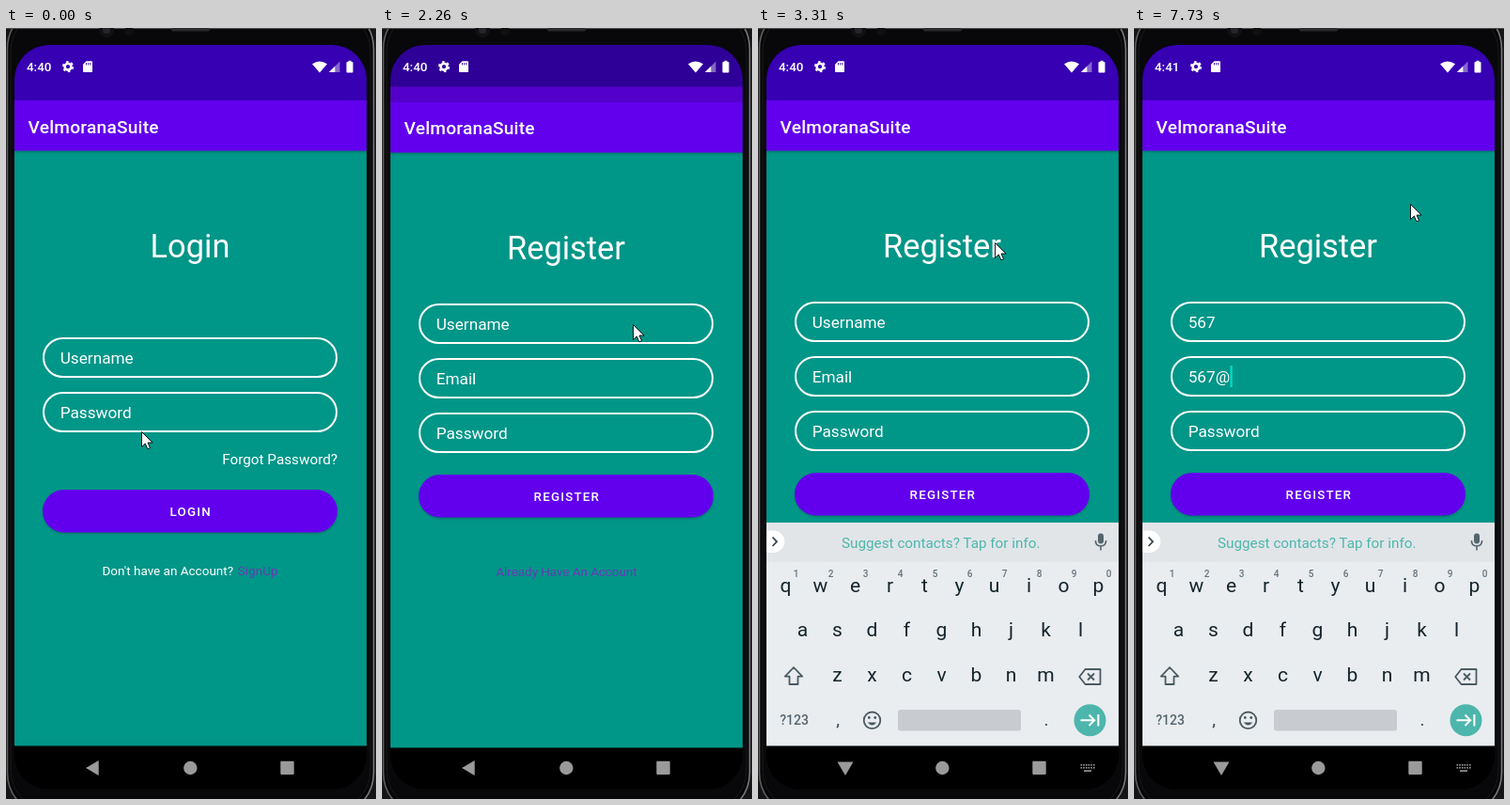
Animation of 394 by 820 pixels, one loop 8 s. Source, as an HTML page:

```html
<!DOCTYPE html>
<html lang="en">
<head>
<meta charset="utf-8">
<title>Register flow</title>
<style>
  html, body { margin: 0; width: 100%; height: 100%; overflow: hidden; background: #050506; }
  svg { display: block; width: 100%; height: 100%; }
  text { font-family: Roboto, sans-serif; fill: #fff; white-space: pre; }
  .medium { font-weight: 500; }
  .mid { text-anchor: middle; }
  .link { fill: #673ab7; }
  .key { fill: #14242c; font-size: 21px; text-anchor: middle; }
  .digit { fill: #65737a; font-size: 10px; font-weight: 500; text-anchor: middle; }
  .line { fill: none; stroke: #4a5a62; stroke-width: 1.8; }
</style>
</head>
<body>
<svg id="stage" viewBox="0 0 394 820"></svg>
<script>
const LOOP = 8000;
const APP_NAME = 'VelmoranaSuite';
const SCREEN = { top: 18, height: 792 };
const FIELD_X = 57.7;

const rect = (x, y, w, h, fill, extra = '') =>
  `<rect x="${x}" y="${y}" width="${w}" height="${h}" fill="${fill}" ${extra}/>`;
const label = (x, y, size, str, cls = '', extra = '') =>
  `<text x="${x}" y="${y}" font-size="${size}" class="${cls}" ${extra}>${str}</text>`;
const path = (d, fill, extra = '') => `<path d="${d}" fill="${fill}" ${extra}/>`;
const circle = (x, y, r, fill, extra = '') =>
  `<circle cx="${x}" cy="${y}" r="${r}" fill="${fill}" ${extra}/>`;

const field = (y, hint, id = '') =>
  rect(40, y + 1, 312, 41, 'none', 'rx="20.5" stroke="#fff" stroke-width="2"') +
  label(FIELD_X, y + 28, 17.2, hint, '', id && `id="${id}"`);

const button = (y, str) =>
  rect(39, y + 1.5, 314, 45.5, '#000', 'rx="22.7" opacity=".2" filter="url(#soft)"') +
  rect(39, y, 314, 45.5, '#6200ee', 'rx="22.7"') +
  label(196.8, y + 27.8, 13.37, str, 'medium mid', 'letter-spacing="1.19"');

const page = (title, body) =>
  rect(9, 130, 375, 633.5, '#009688') +
  rect(9, 130, 375, 4, 'url(#barShadow)') +
  rect(9, 77, 375, 53.5, '#6200ee') +
  label(23.5, 111.5, 19.1, APP_NAME, 'medium', 'letter-spacing=".24"') +
  label(196, 243.6, 34.4, title, 'mid') + body;

const statusBackground = id => rect(9, 18, 375, 59.5, '#3700b3', `id="${id}"`);

const loginPage = statusBackground('loginStatus') + page('Login',
  field(329, 'Username') + field(387, 'Password') +
  label(353, 463.6, 15.28, 'Forgot Password?', '', 'text-anchor="end"') +
  button(491, 'LOGIN') +
  label(102.5, 581.6, 13.5, "Don't have an Account?") +
  label(246.8, 581.6, 13.5, 'SignUp', 'link'));

const registerPage = statusBackground('registerStatus') + page('Register',
  field(291, 'Username', 'username') + field(349, 'Email', 'email') + field(407, 'Password') +
  button(473, 'REGISTER') +
  label(196.5, 581, 13.37, 'Already Have An Account', 'link mid') +
  rect(0, 301, 2.4, 23, '#03dac5', 'id="caret"'));

const statusIcons =
  label(22, 46.3, 13.4, '4:40', 'medium', 'id="clock"') +
  circle(66, 41.2, 3.4, 'none', 'stroke="#fff" stroke-width="2.6"') +
  circle(66, 41.2, 5.2, 'none', 'stroke="#fff" stroke-width="1.8" stroke-dasharray="2.6 2.845"') +
  path('M85.5 35.2H91.2Q92 35.2 92 36V46.2Q92 47 91.2 47H83Q82 47 82 46.2V38.7Z', '#fff') +
  path('M85.5 37v2.4M87.6 37v2.4M89.7 37v2.4', 'none', 'stroke="#3700b3" stroke-width=".9"') +
  path('M334 47.5L326 38.2Q334 33 342 38.2Z', '#fff') +
  path('M355.5 35.5V47H344Z', '#fff', 'opacity=".4"') +
  path('M350.3 40.7V47H344Z', '#fff') +
  rect(362.5, 36, 7, 11.5, '#fff', 'rx="1"') + rect(364.4, 34.8, 3.2, 2, '#fff');

const keyRow = (letters, x, y) =>
  [...letters].map((c, i) => `<text class="key" x="${x + 37 * i}" y="${y}">${c}</text>`).join('');

const keyboard =
  rect(9, 526, 375, 42, '#e1e5e8') + rect(9, 568, 375, 196, '#e9edf0') +
  path('M9 534.5H16.5A11.7 11.7 0 0 1 16.5 558H9Z', '#fff') +
  path('M15.5 541.5L20 546.3L15.5 551', 'none', 'stroke="#37474f" stroke-width="1.8"') +
  label(89, 552.6, 15.28, 'Suggest contacts? Tap for info.', '', 'style="fill:#4db6ac"') +
  rect(362, 537.5, 6, 11, '#56666e', 'rx="3"') +
  path('M359.4 545Q359.4 551 365 551T370.6 545M365 551V555.5', 'none', 'stroke="#56666e" stroke-width="1.6"') +
  keyRow('qwertyuiop', 29.5, 599.5) + keyRow('asdfghjkl', 47.5, 646.8) + keyRow('zxcvbnm', 84.5, 695) +
  [...'1234567890'].map((c, i) => `<text class="digit" x="${40.7 + 37 * i}" y="584.3">${c}</text>`).join('') +
  path('M38 680L28.8 689.6H33.5V698H42.5V689.6H47.2Z', 'none', 'class="line" stroke-linejoin="round"') +
  path('M348.5 682H364.5V698H348.5L342.2 690Z', 'none', 'class="line" stroke-linejoin="round"') +
  path('M351 686.5L358 693.5M358 686.5L351 693.5', 'none', 'class="line"') +
  label(38.5, 741.3, 14, '?123', 'medium mid', 'style="fill:#56666e"') +
  label(85, 742, 19, ',', 'mid', 'style="fill:#37474f"') +
  circle(121.5, 736.3, 8.8, 'none', 'class="line"') +
  path('M116.7 738.4Q121.5 744.6 126.3 738.4Z', '#4a5a62') +
  circle(118.3, 733.5, 1.4, '#4a5a62') + circle(124.7, 733.5, 1.4, '#4a5a62') +
  rect(149, 725, 131, 22.5, '#c8ccd0', 'rx="3"') +
  label(307, 742, 19, '.', 'mid', 'style="fill:#37474f"') +
  circle(353.5, 736.3, 17, '#4db6ac') +
  path('M343.5 736.3H358M352.5 730.5L358.3 736.3L352.5 742M362.4 730V742.6', 'none', 'stroke="#fff" stroke-width="2"');

const keyboardDots = [0, 1, 2, 3, 4, 5].map(i =>
  rect(343.5 + i * 2.7, 783, 1.6, 1.6, '#9a9a9a') + rect(343.5 + i * 2.7, 786, 1.6, 1.6, '#9a9a9a')).join('') +
  rect(347, 789.3, 8, 1.6, '#9a9a9a');

const phone =
  rect(0, 0, 394, 820, '#151517') +
  rect(1.5, -24, 390, 862, '#060607', 'rx="46" stroke="url(#edge)" stroke-width="1.6"') +
  rect(5, -18, 383, 850, '#08080a', 'rx="42" stroke="#1a1a1c"') +
  rect(0, 0, 394, 1, '#4a4a4c') +
  circle(107, 2, 8, '#111114') + circle(107, 2, 4, '#25252b') + circle(131, 3, 5, '#0f0f12') +
  rect(176, 0, 41, 3.5, '#2a2a2d', 'rx="1.7"');

document.getElementById('stage').innerHTML = `
  <defs>
    <clipPath id="screen"><rect x="9" y="18" width="375" height="792" rx="37"/></clipPath>
    <clipPath id="reveal"><rect id="revealBox" x="9" width="375" height="900"/></clipPath>
    <filter id="soft" x="-5%" y="-20%" width="110%" height="150%"><feGaussianBlur stdDeviation="1.3"/></filter>
    <linearGradient id="barShadow" x2="0" y2="1">
      <stop stop-opacity=".2"/><stop offset="1" stop-opacity="0"/>
    </linearGradient>
    <linearGradient id="edge"><stop stop-color="#5c5c5e"/><stop offset="1" stop-color="#77777a"/></linearGradient>
  </defs>
  ${phone}
  <g clip-path="url(#screen)">
    ${rect(9, 18, 375, 792, '#000')}
    <g id="login">${loginPage}</g>
    ${rect(9, 18, 375, 745, '#000', 'id="dim"')}
    <g id="register"><g clip-path="url(#reveal)">${registerPage}</g></g>
    <g id="keyboard">${keyboard}</g>
    <g id="imeNav">
      ${rect(9, 763.5, 375, 47, '#000')}
      ${path('M84.5 780.5H101.5L93 795Z', '#9a9a9a')}${keyboardDots}
    </g>
    ${path('M85 787L98.7 779V795Z', '#9a9a9a', 'id="backNav"')}
    ${circle(196.3, 787, 7.2, '#9a9a9a')}
    ${rect(292.3, 779.7, 14.4, 14.4, '#9a9a9a', 'rx="1"')}
    ${statusIcons}
  </g>
  ${path('M0 0V16L3.8 12.5L6.4 18.3L9 17.1L6.5 11.5H11.6Z', '#fff', 'id="pointer" stroke="#000" stroke-width=".9"')}`;

const $ = id => document.getElementById(id);
const show = (id, on) => $(id).setAttribute('display', on ? 'inline' : 'none');

// Each track is [time, value...]; a value holds until the next entry.
const pointerTrack = [
  [0, 144, 429], [400, 138, 425], [540, 140, 425], [690, 180, 480], [810, 290, 580], [930, 378, 637],
  [1050, 344, 622], [1200, 318, 607], [1320, 293, 592], [1470, 286, 581], [1590, 284, 577],
  [2020, 282, 470], [2140, 273, 338], [2260, 267, 315], [2410, 262, 305], [2950, 252, 228],
  [4110, 251, 230], [4640, 242, 278], [4790, 165, 358], [4910, 155, 358], [5050, 155, 370],
  [5310, 215, 290], [5430, 276, 211], [5570, 294, 187]
];
const usernameTrack = [[0, ''], [3990, '5'], [4360, '56'], [4640, '567']];
const emailTrack = [[0, ''], [6680, '5'], [6830, '56'], [7080, '567'], [7730, '567@']];
const caretTrack = [
  [0, false], [2800, true], [3310, false], [3870, true], [5050, false],
  [5310, true], [5830, false], [6390, true], [7610, false], [7730, true]
];
const slideTicks = [[0], [2020], [2140], [2260], [2410]];
const keyboardTicks = [[0], [3190], [3310]];

const hold = (track, t) => track.findLast(entry => entry[0] <= t);
const clamp = v => Math.min(1, Math.max(0, v));

// Material "fast out, slow in": cubic-bezier(.4, 0, .2, 1)
function fastOutSlowIn(x) {
  let lo = 0, hi = 1;
  for (let i = 0; i < 24; i++) {
    const u = (lo + hi) / 2, v = 1 - u;
    if (1.2 * u * v * v + 0.6 * u * u * v + u ** 3 < x) lo = u; else hi = u;
  }
  return lo * lo * (3 - 2 * lo);
}

function drawTransition(t) {
  const f = clamp((hold(slideTicks, t)[0] - 1962) / 425);
  const p = f < 1 ? fastOutSlowIn(f) : 1;
  const sliding = f > 0 && f < 1;
  show('login', f < 1);
  show('dim', sliding);
  show('register', f > 0);
  show('registerStatus', !sliding);
  $('login').setAttribute('transform', `translate(0 ${-15.4 * p})`);
  $('dim').setAttribute('opacity', 0.16 * p);
  $('register').setAttribute('transform', `translate(0 ${32.5 * (1 - p)})`);
  $('revealBox').setAttribute('y', SCREEN.top + SCREEN.height * (1 - f) ** 5);
}

function drawKeyboard(t) {
  const p = clamp((hold(keyboardTicks, t)[0] - 3110) / 200);
  show('keyboard', p > 0);
  show('imeNav', t >= 3070);
  show('backNav', t < 3070);
  $('keyboard').setAttribute('opacity', Math.sqrt(p));
  $('keyboard').setAttribute('transform', `translate(0 ${60 * (1 - p) ** 2})`);
}

function drawFields(t) {
  const username = hold(usernameTrack, t)[1], email = hold(emailTrack, t)[1];
  $('username').textContent = username || 'Username';
  $('email').textContent = email || 'Email';
  const onEmail = t >= 5310;
  const typed = onEmail ? email : username;
  const width = typed ? $(onEmail ? 'email' : 'username').getComputedTextLength() : 0;
  $('caret').setAttribute('x', FIELD_X + 0.3 + width);
  $('caret').setAttribute('y', onEmail ? 359 : 301);
  show('caret', hold(caretTrack, t)[1]);
}

function draw(now) {
  const t = now % LOOP;
  drawTransition(t);
  drawKeyboard(t);
  drawFields(t);
  $('clock').textContent = t < 6680 ? '4:40' : '4:41';
  const [, x, y] = hold(pointerTrack, t);
  $('pointer').setAttribute('transform', `translate(${x + 0.5} ${y + 0.5})`);
}

const start = performance.now();
function loop() {
  draw(performance.now() - start);
  requestAnimationFrame(loop);
}
loop();
</script>
</body>
</html>
```
